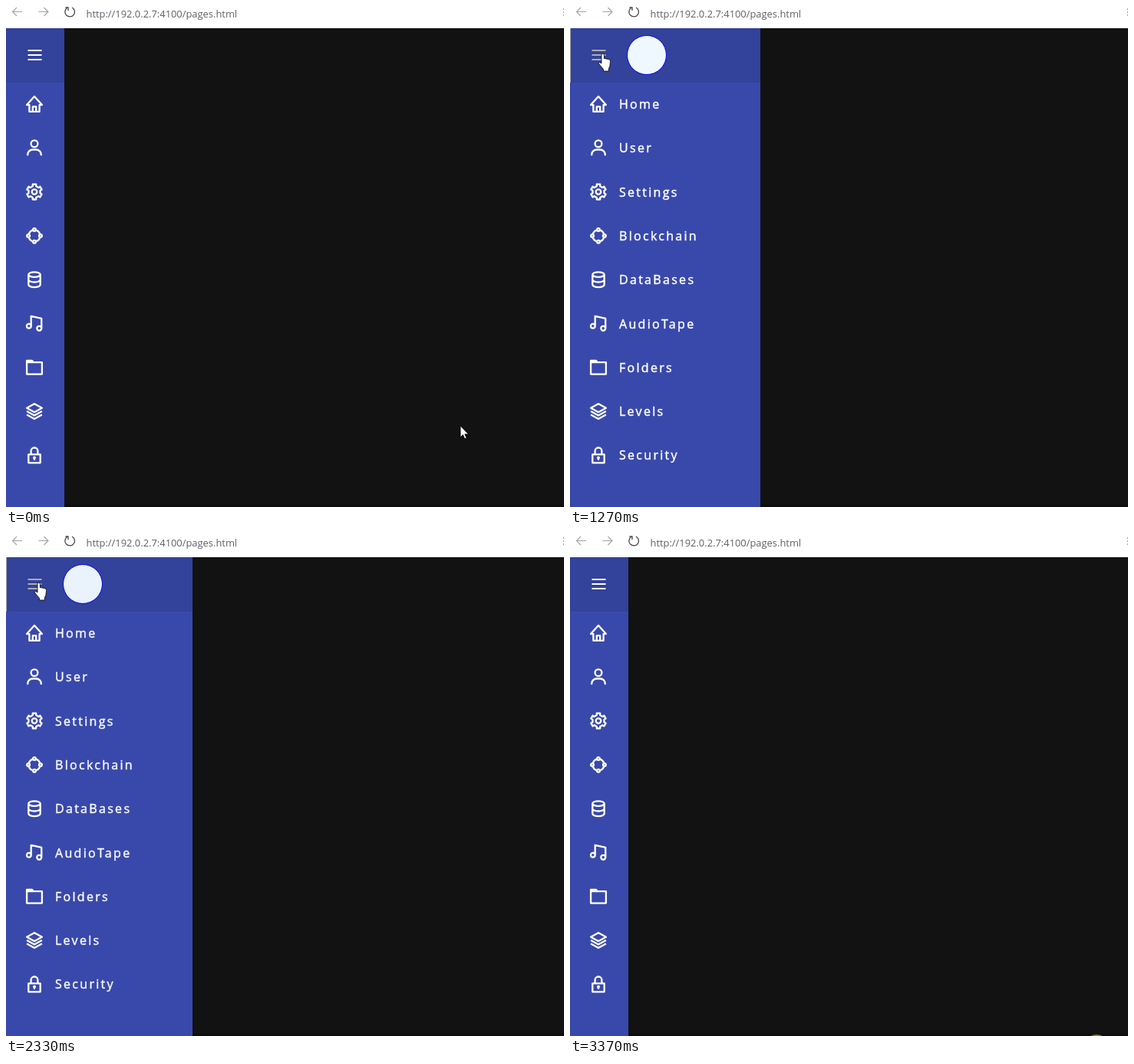
These frames come from a looping animation (727 px wide and 654 px high, 3500 ms). An HTML page:

```html
<!DOCTYPE html>
<html lang="en">
<head>
<meta charset="utf-8">
<title>Sidebar menu</title>
<style>
html, body { margin: 0; height: 100%; overflow: hidden; background: #121212; }
svg { display: block; width: 100vw; height: 100vh; }
.line { fill: none; stroke: #fff; stroke-width: 2.1; stroke-linejoin: round; }
.label { font: 16px "Open Sans", "Noto Sans", sans-serif; letter-spacing: 2.3px; fill: #fff; stroke: #fff; stroke-width: .45; }
.url { font: 12.9px "Open Sans", "Noto Sans", sans-serif; fill: #606069; }
</style>
</head>
<body>
<svg viewBox="0 0 727 654">
  <defs><clipPath id="clip"><rect id="edge" y="29" width="76" height="625"/></clipPath></defs>
  <rect width="727" height="654" fill="#121212"/>
  <rect y="651" width="727" height="3" opacity=".3"/>
  <g clip-path="url(#clip)">
    <rect y="29" width="248" height="625" fill="#3949ab"/>
    <rect y="29" width="248" height="71" fill="#33429a"/>
    <g id="icons"></g>
    <g id="fade">
      <circle cx="100" cy="64" r="25.5" fill="#f0f8ff" stroke="#00f"/>
      <g id="labels" class="label"></g>
    </g>
  </g>
  <rect id="rim" y="29" width="1" height="71" fill="#aaa"/>
  <path id="burger" d="M28.5 58h18m-18 6h18m-18 6h18" stroke-width="2"/>

  <rect width="727" height="29" fill="#fff"/>
  <g fill="none" stroke="#a2a2a6" stroke-width="1.1">
    <path d="M21 7.5H8.5M14 2 8.500 7.5 14 13M42.500 7.5H55M49.500 2 55 7.500 49.500 13"/>
    <path d="M79.500 2.500a6.300 6.300 0 1 0 6.500-.5M77.500 2h3.500v4" stroke="#444" stroke-width="1.3"/>
    <path d="M726.500 3v2m0 2v2m0 2v2"/>
  </g>
  <text class="url" x="104.500" y="15">http://192.0.2.7:4100/pages.html</text>

  <g id="cursor" fill="#fff" stroke="#000" stroke-width=".8">
    <path id="arrow" d="M0 0v15l3.400-3.200 2.300 5.200 2.400-1-2.300-5.100h4.700z"/>
    <path id="hand" d="M-1 2a1.700 1.700 0 0 1 3.400 0v4.500l6 1q2.300.6 2.200 3l-.8 6.500-1.400 2.500v3.500H1.500v-2.500L-4 14q-1.200-2 .7-2.600L-1 13z"/>
  </g>
  <circle id="press" r="15" fill="#ff0" opacity=".5"/>
</svg>
<script>
const el = id => document.getElementById(id);
const set = (id, attrs) => {
  for (const k in attrs) el(id).setAttribute(k, attrs[k]);
};
const clamp = v => Math.min(1, Math.max(0, v));
const mix = (a, b, p) => a + (b - a) * p;
const ring = (x, y, r) => `M${x - r} ${y}a${r} ${r} 0 1 0 ${2 * r} 0a${r} ${r} 0 1 0 ${-2 * r} 0`;

// Six teeth, four corners each
function gear() {
  const pts = [];
  for (let tooth = 0; tooth < 6; tooth++)
    for (const [deg, r] of [[-17, 7], [-12.5, 9.2], [12.5, 9.2], [17, 7]]) {
      const a = (tooth * 60 + deg) * Math.PI / 180;
      pts.push((12 + r * Math.sin(a)).toFixed(2) + ' ' + (12 - r * Math.cos(a)).toFixed(2));
    }
  return `M${pts.join('L')}z` + ring(12, 12, 3);
}

const nodes = ring(12, 4.8, 1.7) + ring(19.2, 12, 1.7) + ring(12, 19.2, 1.7) + ring(4.8, 12, 1.7);
const menu = [
  ['Home', 'M3 13h3v8h12v-8h3L12 3zM10 21v-6h4v6'],
  ['User', ring(12, 7, 4) + 'M4 21v-1a6 6 0 0 1 6-6h4a6 6 0 0 1 6 6v1'],
  ['Settings', gear()],
  ['Blockchain', nodes + 'M10.300 5.200Q6.500 6.500 5.200 10.300M13.700 5.200Q17.500 6.500 18.800 10.300M10.300 18.800Q6.500 17.500 5.200 13.700M13.700 18.800Q17.500 17.500 18.800 13.700'],
  ['DataBases', 'M5 6a7 3 0 0 1 14 0a7 3 0 0 1-14 0v12a7 3 0 0 0 14 0V6M5 12a7 3 0 0 0 14 0'],
  ['AudioTape', ring(5.5, 15, 2.6) + 'M8.100 15V3.200l12.300 2.800v11.700' + ring(17.7, 17.7, 2.7)],
  ['Folders', 'M3 20V6h18v14zM3 6V4h6.300l1.700 2M3 5h7'],
  ['Levels', 'M12 3 3 8l9 5 9-5zM3 12l9 5 9-5M3 16l9 5 9-5'],
  ['Security', 'M5 11h14v10H5zM8 11V7a4 4 0 0 1 8 0v4M12 15v3' + ring(12, 15, .8)]
];
menu.forEach(([name, path], i) => {
  const y = 128 + i * 57.3;
  el('icons').innerHTML += `<path class="line" d="${path}" transform="translate(23.8 ${y - 13.2}) scale(1.1)"/>`;
  el('labels').innerHTML += `<text x="64" y="${y + 6}">${name}</text>`;
});

// CSS "ease": cubic-bezier(.25, .1, .25, 1)
function ease(x) {
  x = clamp(x);
  const curve = (a, b, s) => 3 * a * s * (1 - s) ** 2 + 3 * b * s * s * (1 - s) + s ** 3;
  let lo = 0, hi = 1;
  for (let i = 0; i < 24; i++) {
    const mid = (lo + hi) / 2;
    if (curve(.25, .25, mid) < x) lo = mid; else hi = mid;
  }
  return x === 1 ? 1 : curve(.1, 1, lo);
}

const LOOP = 3500, FADE = 400;
const toggles = [820, 1565, 2016, 2490];
const ramp = (t, start) => ease((t - start) / FADE);

function draw(t) {
  const open = toggles.reduce((sum, s, i) => sum + (i % 2 ? -1 : 1) * ramp(t, s), 0);
  set('edge', { width: Math.round(76 + 172 * open) });
  set('fade', { opacity: open });

  const hover = ramp(t, 500) - ramp(t, 2560);
  const grey = Math.round(mix(255, 172, hover));
  set('burger', { stroke: `rgb(${grey},${grey},${grey})` });
  set('rim', { opacity: hover });

  const come = clamp((t - 40) / 560);
  const leave = Math.max(0, (t - 2500) / 240) ** 1.5;
  const p = come * come * (3 - 2 * come);
  const x = mix(592, 42, p) + 464 * leave;
  const y = mix(548, 62, p) + 563 * leave;
  const overMenu = x < 76 + 172 * open;
  set('cursor', { transform: `translate(${x} ${y})`, visibility: t < 2850 ? 'visible' : 'hidden' });
  set('arrow', { display: overMenu ? 'none' : 'inline' });
  set('hand', { display: overMenu ? 'inline' : 'none' });

  const last = t >= 3370;
  const pressed = last || toggles.some(s => t >= s - 92 && t < s + 25);
  set('press', { cx: last ? 686 : 42, cy: last ? 667 : 62, visibility: pressed ? 'visible' : 'hidden' });
}

const begin = performance.now();
function tick() {
  draw((performance.now() - begin) % LOOP);
  requestAnimationFrame(tick);
}
tick();
</script>
</body>
</html>
```
